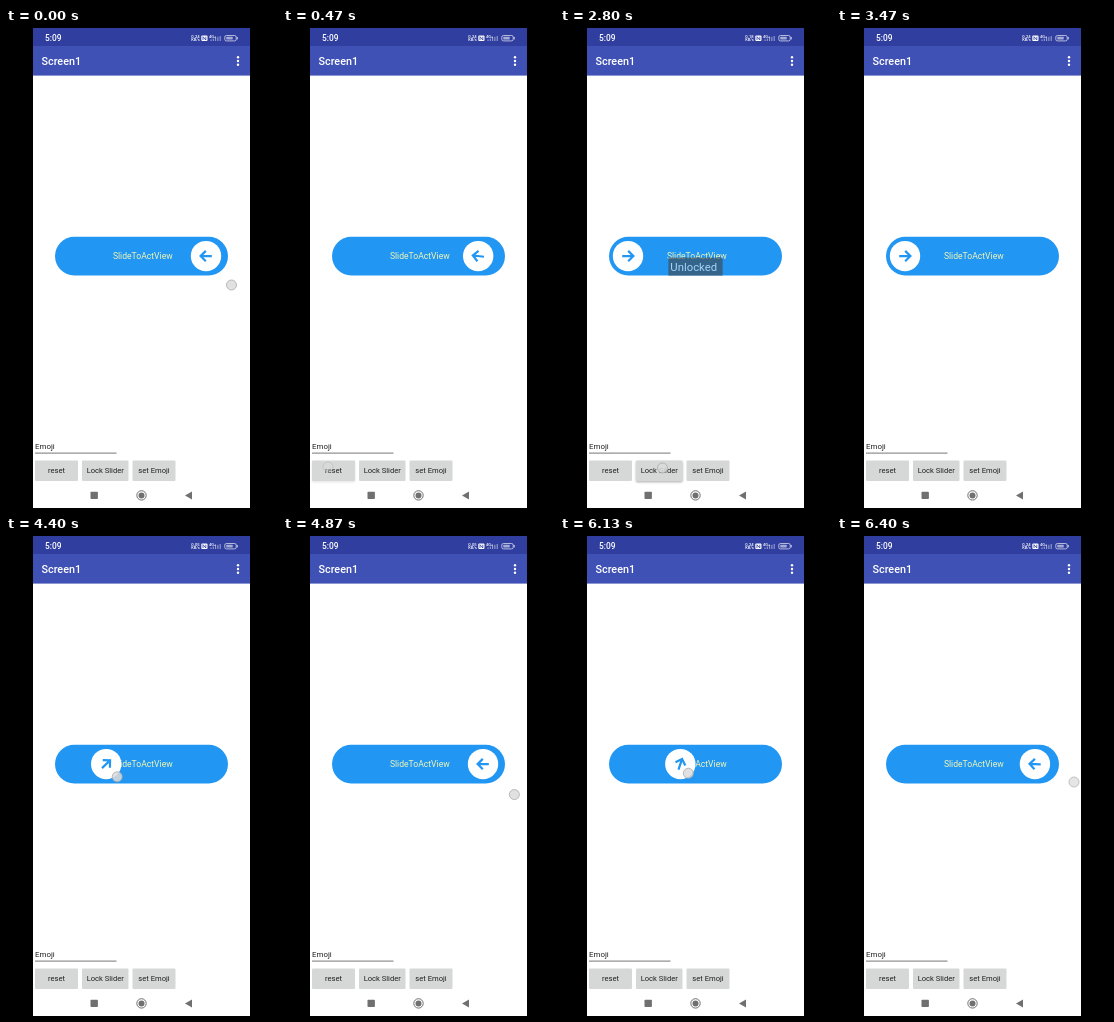
An HTML page for the animation above (6.47 s loop, 271 by 480 pixels).

```html
<!DOCTYPE html>
<html lang="en">
<head>
<meta charset="utf-8">
<title>Slide to act</title>
<style>
html, body { margin: 0; width: 100%; height: 100%; overflow: hidden; background: #000; }
svg { display: block; width: 100vw; height: 100vh; }
text { font-family: Roboto, Inter, sans-serif; }
.mid { text-anchor: middle; }
</style>
</head>
<body>
<svg viewBox="0 0 271 480">
  <defs>
    <clipPath id="screen"><rect x="27" width="217" height="480"/></clipPath>
    <filter id="blur" x="-20%" y="-40%" width="140%" height="180%"><feGaussianBlur stdDeviation="1"/></filter>
  </defs>
  <rect width="271" height="480" fill="#000"/>
  <g clip-path="url(#screen)">
    <rect x="27" width="217" height="480" fill="#fff"/>
    <rect x="27" width="217" height="18.5" fill="#303f9f"/>
    <rect x="27" y="18" width="217" height="29.6" fill="#3f51b5"/>

    <g fill="#fff">
      <text x="39" y="13" font-size="8.4" font-weight="500">5:09</text>
      <text x="35.5" y="37" font-size="10.8" font-weight="500">Screen1</text>
      <circle cx="232" cy="29.2" r="1.2"/><circle cx="232" cy="33" r="1.2"/><circle cx="232" cy="36.8" r="1.2"/>
      <g font-weight="500">
        <text id="speed" class="mid" x="189.5" y="9.8" font-size="4.2"></text>
        <text class="mid" x="189.5" y="13.4" font-size="4">KB/s</text>
        <text x="203" y="10.3" font-size="4">4G+</text>
      </g>
      <rect x="195.3" y="7.5" width="6.2" height="5.6" rx="1"/>
      <path d="M197 12V8.7L199.8 12V8.7" fill="none" stroke="#303f9f" stroke-width="0.8"/>
      <path d="M205 13v-1.6M207.3 13v-2.4M209.6 13v-3.3M211.9 13v-4.2M214.2 13v-5" stroke="#fff" stroke-width="0.9" opacity="0.6"/>
      <g opacity="0.8">
        <rect x="218.8" y="7.5" width="11.4" height="5.4" rx="1.6" fill="none" stroke="#fff" stroke-width="0.8"/>
        <rect x="220.3" y="8.8" width="6.4" height="2.8" rx="0.5" opacity="0.7"/>
        <rect x="230.7" y="9" width="1" height="2.4"/>
      </g>
    </g>

    <rect x="49" y="208.8" width="173" height="38.6" rx="19.3" fill="#2196f3"/>
    <text class="mid" x="136.8" y="231.2" font-size="8.6" fill="#f2f7b5">SlideToActView</text>
    <g id="knob">
      <circle r="15.2" fill="#fff"/>
      <path id="arrow" d="M-5.8 0H5M0.2-5.2 5.4 0 0.2 5.2" fill="none" stroke="#2196f3" stroke-width="2.2"/>
    </g>

    <text x="29" y="421.2" font-size="7.9" fill="#222">Emoji</text>
    <rect x="29" y="424.6" width="81.5" height="1" fill="#777"/>
    <g id="buttons"></g>

    <g fill="#707070">
      <rect x="84.5" y="463.7" width="7.4" height="7.4" rx="0.8"/>
      <circle cx="135.5" cy="467.4" r="4.7" fill="none" stroke="#707070" stroke-width="1"/>
      <circle cx="135.5" cy="467.4" r="3"/>
      <path d="M179 467.4 186 463.4V471.4Z"/>
    </g>

    <g id="toast">
      <rect x="-28.5" y="-9.5" width="57" height="19" fill="#444"/>
      <text class="mid" x="-1.9" y="4.6" font-size="11.9" fill="#fff">Unlocked</text>
    </g>
    <circle id="touch" r="5" fill="#dcdcdc" fill-opacity="0.85" stroke="#aaa" stroke-width="0.8"/>
  </g>
</svg>
<script>
const LOOP = 6470, STEP = 200 / 3;
const LEFT = 68, RIGHT = 200, RETURN_TIME = 300;
const RESET_AT = 430;

const el = id => document.getElementById(id);
const set = (node, name, value) => node.setAttribute(name, value);
const clamp = (v, low = 0, high = 1) => Math.min(high, Math.max(low, v));
const easeInOut = u => (1 - Math.cos(Math.PI * clamp(u))) / 2;
const pulse = (t, down, up, fadeIn, fadeOut) =>
  clamp((t - down) / fadeIn) * clamp(1 - (t - up) / fadeOut);

function makeButton(label, x, width) {
  const group = document.createElementNS("http://www.w3.org/2000/svg", "g");
  const box = `x="${x}" width="${width}" height="20.4" rx="1"`;
  group.innerHTML = `<rect ${box} y="433.8" filter="url(#blur)"/>
    <rect ${box} y="432.6" fill="#d6d7d7"/>
    <text class="mid" x="${x + width / 2}" y="445" font-size="7.6" fill="#222">${label}</text>`;
  el("buttons").append(group);
  return group.firstElementChild;
}

// Contacts with the screen: taps stay put, drags travel by (dx, dy) between start and end.
const held = { down: -100, up: 50, x: 225.5, y: 257 };
const taps = [
  { down: 131, up: 380, x: 45, y: 439, shadow: makeButton("reset", 29, 43) },
  { down: 2700, up: 2940, x: 102.5, y: 440, shadow: makeButton("Lock Slider", 76, 46.5) },
];
const drags = [
  { down: 3980, start: 4150, end: 5000, up: 5095, x: 79, y: 236, dx: 162, dy: 24 },
  { down: 5780, start: 5997, end: 6350, up: 6376, x: 76, y: 233, dx: 161, dy: 13 },
];
const contacts = [held, ...taps, ...drags];
set(makeButton("set Emoji", 126.5, 43), "opacity", 0);

const travel = (c, t) => c.dx ? easeInOut((t - c.start) / (c.end - c.start)) : 0;

function knobX(t) {
  const drag = drags.findLast(d => t >= d.down);
  if (drag && t < drag.up) return clamp(LEFT + drag.dx * travel(drag, t), LEFT, RIGHT);
  const released = drag ? drag.up : RESET_AT;
  return RIGHT - (RIGHT - LEFT) * easeInOut((t - released) / RETURN_TIME);
}

function drawTouch(t) {
  const contact = contacts.findLast(c => t >= c.down);
  const u = travel(contact, t);
  const x = contact.x + (contact.dx || 0) * u, y = contact.y + (contact.dy || 0) * u;
  set(el("touch"), "transform", `translate(${x} ${y})`);
  set(el("touch"), "opacity", pulse(t, contact.down, contact.up, 80, 160));
}

function draw(t) {
  const x = knobX(t);
  set(el("knob"), "transform", `translate(${x} 228.1)`);
  set(el("arrow"), "transform", `rotate(${-180 * (x - LEFT) / (RIGHT - LEFT)})`);

  const shown = pulse(t, 470, 2667, 330, 330);
  set(el("toast"), "opacity", shown);
  set(el("toast"), "transform", `translate(135.5 238.6) scale(${0.88 + 0.12 * shown})`);

  for (const tap of taps) set(tap.shadow, "opacity", 0.3 * pulse(t, tap.down, tap.up, 90, 130));
  drawTouch(t);
  el("speed").textContent = ["0.24", "0.05", "0.18"][Math.floor(t / 1000) % 3];
}

const origin = performance.now();
function tick() {
  const t = (performance.now() - origin) % LOOP;
  draw(Math.floor((t + 4) / STEP) * STEP);
  requestAnimationFrame(tick);
}
tick();
</script>
</body>
</html>
```
